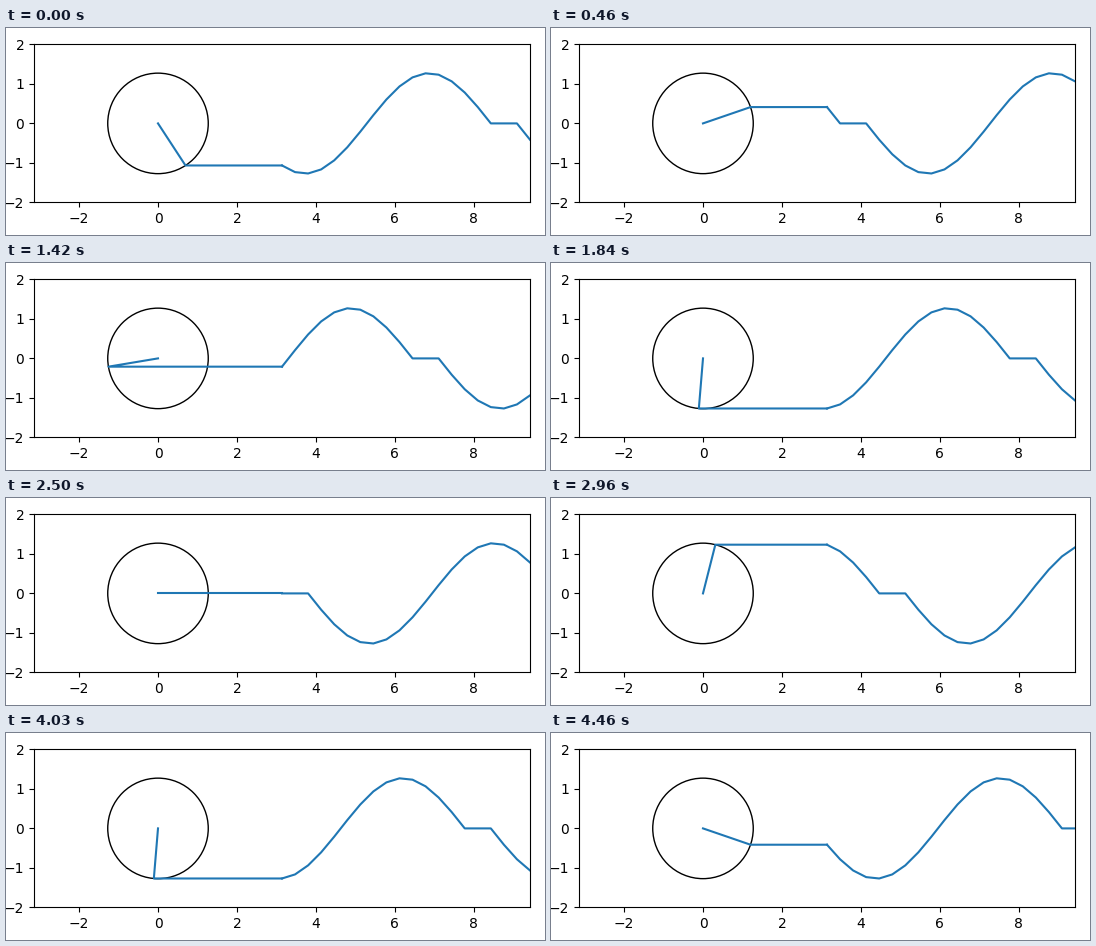
Animation, 539 px wide and 207 px high, one loop 4550 ms. Source, as a matplotlib script:

```python
import numpy as np
import matplotlib.pyplot as plt
from matplotlib.animation import FuncAnimation

W, H, DPI = 539, 207, 100
LOOP, TICK = 4550, 25            # ms
STEPS = 20                       # angles per turn, both ends included
FIRST = 16                       # angle index at the start of the loop
RADIUS = 4 / np.pi

# Runs of evenly spaced updates: first time, last time (ms), count
RUNS = [(30, 120, 2), (260, 540, 4), (680, 770, 2), (910, 1420, 6),
        (1560, 1840, 4), (1990, 2170, 3), (2310, 2500, 3), (2640, 2730, 2),
        (2870, 3150, 4), (3290, 3380, 2), (3530, 3710, 3), (3850, 4130, 4),
        (4280, 4460, 3)]
updates = np.concatenate([np.linspace(*run) // 10 * 10 for run in RUNS])

theta = np.linspace(0, 2 * np.pi, STEPS)
# Every turn records its first height twice
heights = RADIUS * np.sin(np.insert(theta, 0, 0))
trail_x = np.linspace(np.pi, 3 * np.pi, STEPS)
age = np.arange(STEPS)

# The tiny nudge guards against rounding down to one pixel less
fig = plt.figure(figsize=((W + 1e-6) / DPI, (H + 1e-6) / DPI), dpi=DPI,
                 facecolor="white")
ax_w = 496
ax_h = ax_w / np.pi
ax = fig.add_axes([28 / W, 32.66 / H, ax_w / W, ax_h / H])
ax.set(xlim=(-np.pi, 3 * np.pi), ylim=(-2, 2),
       xticks=range(-2, 9, 2), yticks=range(-2, 3))
ax.add_patch(plt.Circle((0, 0), RADIUS, fill=False))
arm, = ax.plot([], [], color="C0")
wave, = ax.plot([], [], color="C0")


def init():
    return arm, wave


def draw(i):
    now = i * TICK + TICK - 1
    k = (FIRST + np.searchsorted(updates, now, side="right")) % STEPS
    trail = heights[(k + 1 - age) % len(heights)]
    x, y = RADIUS * np.cos(theta[k]), trail[0]
    arm.set_data([0, x, np.pi], [0, y, y])
    wave.set_data(trail_x, trail)
    return arm, wave


anim = FuncAnimation(fig, draw, frames=LOOP // TICK, init_func=init,
                     interval=TICK, repeat=True, repeat_delay=0)
plt.show()
```
